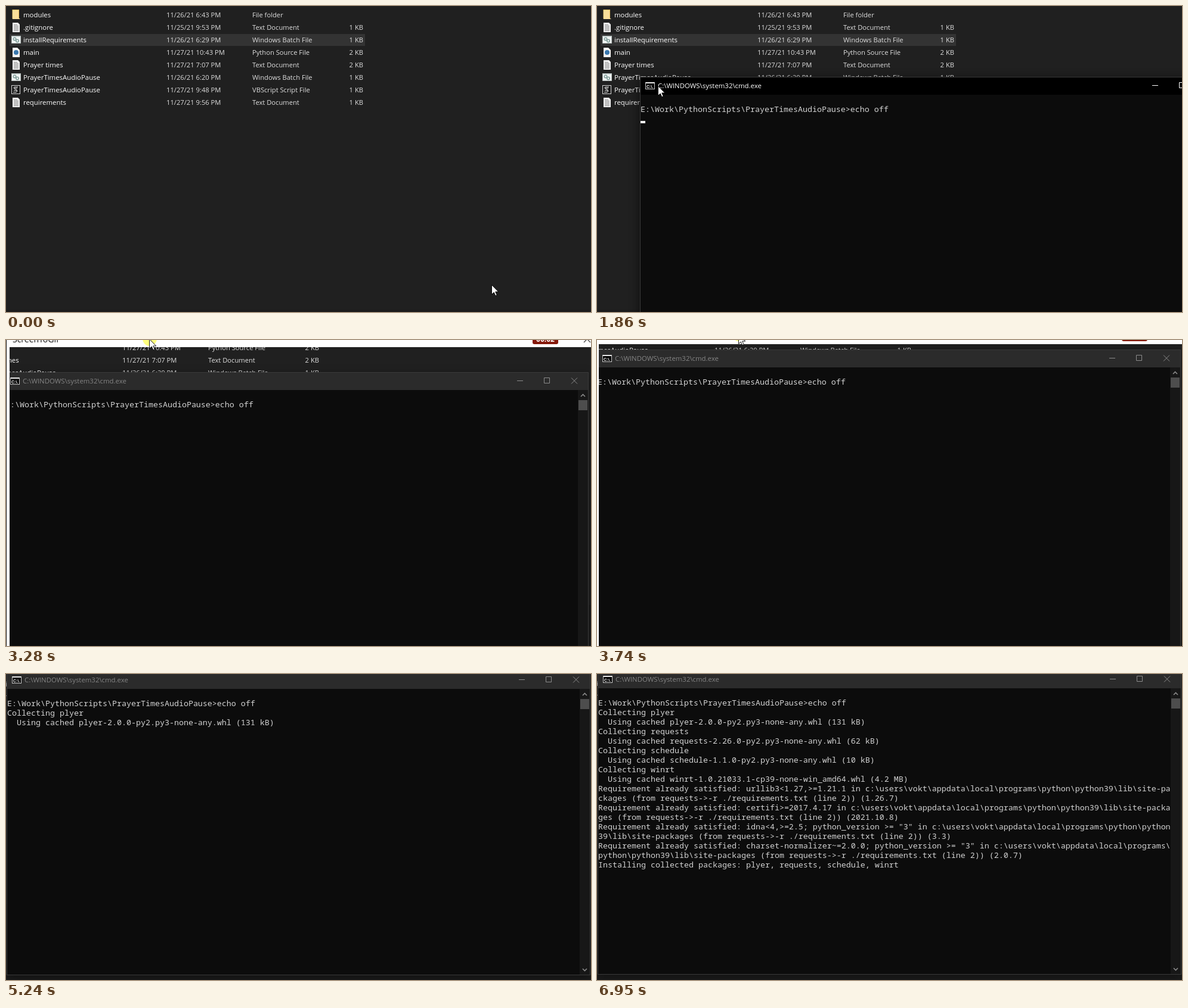
An HTML page for the animation above (8000 ms loop, 981 by 514 pixels).

```html
<!DOCTYPE html>
<html lang="en">
<head>
<meta charset="utf-8">
<title>Batch install</title>
<style>
html, body { margin: 0; width: 100%; height: 100%; overflow: hidden; background: #202020; }
svg { display: block; width: 981px; height: 514px; }
text { white-space: pre; }
.ui { font: 11.2px "Open Sans", sans-serif; }
.name { font-size: 11.4px; }
.mono { font: 13.333px "Noto Sans Mono", monospace; fill: #d2d2d2; }
</style>
</head>
<body>
<svg viewBox="0 0 981 514">
  <defs>
    <filter id="soft" x="-10%" y="-10%" width="120%" height="120%"><feGaussianBlur stdDeviation="9"/></filter>
    <g id="folder">
      <path d="M10.500 6h11.500v15.500h-11.500z" fill="#e9c262"/>
      <path d="M11 7h10v13l3 2h-13z" fill="#fbe09a"/>
    </g>
    <g id="doc">
      <path d="M11 7h9l3 3v13h-12z" fill="#f4f4f4"/>
      <path d="M13 10.500h6M13 12.500h8M13 14.500h8M13 16.500h8M13 18.500h8M13 20.500h8" stroke="#8d8d8d"/>
    </g>
    <g id="batch">
      <rect x="9.500" y="8.500" width="15" height="12" fill="#f3f6f5" stroke="#b5bdbb"/>
      <path d="M10 9.500h14" stroke="#c9d6d6"/>
      <g fill="none" stroke="#7f9c98" stroke-width="1.600"><circle cx="14.500" cy="13.500" r="2.200"/><circle cx="19" cy="16.500" r="2.200"/></g>
    </g>
    <g id="py">
      <path d="M11 7h8l4 4v12h-12z" fill="#f4f4f4"/>
      <circle cx="17" cy="15" r="4" fill="#3a78ae"/>
    </g>
    <g id="vbs">
      <rect x="9.500" y="7.500" width="14" height="14" fill="#1b1b1b" stroke="#d5d5d5"/>
      <path d="M20 10h-6q-2 1 0 3l4 2q2 2-1 4h-5M14 12h5M13 16h5" fill="none" stroke="#e8e8e8"/>
    </g>
  </defs>
  <g id="desk">
    <rect x="-50" y="-50" width="1250" height="560" fill="#202020"/>
    <rect x="-50" y="510" width="1250" height="400" fill="#1c1c1c"/>
    <rect x="6" y="47" width="596" height="20" fill="#333"/>
    <rect id="hover" x="6" width="596" height="20" fill="#4d4d4d"/>
    <g id="files" class="ui"></g>
    <g id="win">
      <rect id="shade" x="72" y="124" width="979" height="512" filter="url(#soft)"/>
      <rect x="72" y="119" width="979" height="511" fill="#0c0c0c"/>
      <rect id="bar" x="72" y="119" width="979" height="30"/>
      <rect x="81.500" y="128.500" width="15" height="11" fill="#000" stroke="#c8c8c8"/>
      <path d="M82 129h14" stroke="#e8e8e8" stroke-width="2"/>
      <text x="83" y="137.500" fill="#fff" style="font:bold 7px 'Liberation Sans',sans-serif">C:\.</text>
      <text id="title" class="ui name" x="102" y="138">C:\WINDOWS\system32\cmd.exe</text>
      <path id="btns" d="M931 133.500h10M976.500 128.500h9v9h-9zM1022 128.500l10 10M1032 128.500l-10 10" fill="none"/>
      <rect x="1033" y="149" width="17" height="480" fill="#171717"/>
      <rect x="1034" y="166" width="15" height="17" fill="#4d4d4d"/>
      <path d="M1038 160l3.500-3.500 3.500 3.500M1038 619l3.500 3.500 3.500-3.500" fill="none" stroke="#8a8a8a" stroke-width="1.600"/>
      <rect x="72.500" y="119.500" width="978" height="510" fill="none" stroke="#3a3a3a"/>
      <g id="out" class="mono"></g>
      <rect id="caret" x="73" y="193" width="8" height="4" fill="#f2f2f2"/>
    </g>
  </g>
  <g id="frame">
    <rect x="-6" y="-40" width="993" height="40" fill="#fff"/>
    <rect x="-5" y="-1" width="5" height="600" fill="#fff"/>
    <path d="M-5.500-40v640" stroke="#111"/>
    <text x="5" y="-8.500" fill="#111" style="font:14px 'Open Sans',sans-serif">ScreenToGif</text>
    <rect x="877" y="-25" width="43" height="20" rx="3" fill="#85190b"/>
    <text x="898.500" y="-9" fill="#fff" text-anchor="middle" style="font:bold 12px 'Open Sans',sans-serif">00:02</text>
    <path d="M963-19l11 11M974-19l-11 11" stroke="#444" stroke-width="1.300"/>
  </g>
  <g id="mouse">
    <circle id="press" r="12" fill="#ff0" fill-opacity=".5"/>
    <path d="M-.5 .5V16.500L3.200 13L5.800 18.700L8.200 17.600L5.700 12H10.700Z" fill="#fff" stroke="#000" stroke-width=".9"/>
  </g>
</svg>
<script>
const LOOP = 8000, TICK = 71, PHASE = 14;
const $ = id => document.getElementById(id);
const set = (el, attrs) => { for (const k in attrs) el.setAttribute(k, attrs[k]); };
const show = (el, on) => set(el, { visibility: on ? 'inherit' : 'hidden' });
const move = (el, x, y) => set(el, { transform: `translate(${x} ${y})` });
function add(parent, tag, attrs, text = '') {
  const el = document.createElementNS('http://www.w3.org/2000/svg', tag);
  set(el, attrs);
  el.textContent = text;
  return parent.appendChild(el);
}

const files = [
  ['folder', 'modules', '26/21 6:43', 'File folder', ''],
  ['doc', '.gitignore', '25/21 9:53', 'Text Document', '1 KB'],
  ['batch', 'installRequirements', '26/21 6:29', 'Windows Batch File', '1 KB'],
  ['py', 'main', '27/21 10:43', 'Python Source File', '2 KB'],
  ['doc', 'Prayer times', '27/21 7:07', 'Text Document', '2 KB'],
  ['batch', 'PrayerTimesAudioPause', '26/21 6:20', 'Windows Batch File', '1 KB'],
  ['vbs', 'PrayerTimesAudioPause', '27/21 9:48', 'VBScript Script File', '1 KB'],
  ['doc', 'requirements', '27/21 9:56', 'Text Document', '1 KB']
];
files.forEach(([icon, name, date, type, size], i) => {
  const y = 19 + 21 * i, fill = '#dedede', box = $('files');
  add(box, 'use', { href: '#' + icon, y: 21 * i });
  add(box, 'text', { x: 29, y, fill: '#fff', class: 'name' }, name);
  add(box, 'text', { x: 269, y, fill }, `11/${date} PM`);
  add(box, 'text', { x: 413, y, fill }, type);
  add(box, 'text', { x: 599, y, fill, 'text-anchor': 'end' }, size);
});

// Console output: when each batch is printed, wrapped at 120 columns
const site = 'c:\\users\\vokt\\appdata\\local\\programs\\python\\python39\\lib\\site-packages (from requests->-r ./requirements.txt (line 2))';
const need = (spec, ver) => `Requirement already satisfied: ${spec} in ${site} (${ver})`;
const cached = (file, size) => `  Using cached ${file}.whl (${size})`;
const log = [
  [1650, 'E:\\Work\\PythonScripts\\PrayerTimesAudioPause>echo off'],
  [5090, 'Collecting plyer', cached('plyer-2.0.0-py2.py3-none-any', '131 kB')],
  [5630, 'Collecting requests'],
  [5700, cached('requests-2.26.0-py2.py3-none-any', '62 kB')],
  [5960, 'Collecting schedule', cached('schedule-1.1.0-py2.py3-none-any', '10 kB')],
  [6320, 'Collecting winrt', cached('winrt-1.0.21033.1-cp39-none-win_amd64', '4.2 MB')],
  [6600, need('urllib3<1.27,>=1.21.1', '1.26.7'), need('certifi>=2017.4.17', '2021.10.8')],
  [6820, need('idna<4,>=2.5; python_version >= "3"', '3.3'),
    need('charset-normalizer~=2.0.0; python_version >= "3"', '2.0.7')],
  [6950, 'Installing collected packages: plyer, requests, schedule, winrt']
];
const lines = [];
for (const [at, ...texts] of log)
  for (const part of texts.flatMap(s => s.match(/.{1,120}/g)))
    lines.push({ at, el: add($('out'), 'text', { x: 73, y: 178 + 16 * lines.length }, part) });

const ramp = (t, a, b) => Math.max(0, Math.min(1, (t - a) / (b - a)));
const easeOut = p => 1 - (1 - p) ** 2;

// Mouse legs: start, end, destination
const legs = [
  [69, 70, 478, 317], [160, 910, 63, 60], [1520, 1860, 103, 134], [1860, 2270, 190, 34],
  [2270, 2740, 235, -21], [5900, 6120, 301, 157], [6120, 6750, 680, 520]
];
function mouseAt(t) {
  let x = 815, y = 468;
  for (const [a, b, toX, toY] of legs) {
    const f = easeOut(ramp(t, a, b));
    x += (toX - x) * f;
    y += (toY - y) * f;
  }
  return [Math.round(x), Math.round(y)];
}

function draw(t) {
  // Motion is seen at the screen's refresh ticks
  const k = Math.max(0, Math.floor((t - PHASE) / TICK + 0.01) * TICK + PHASE);

  // The recorder is dragged over the desktop; its frame runs ahead with the speed
  const drag = ramp(k, 2800, 4330);
  const panX = -74 * easeOut(ramp(k, 2800, 3280)) + 3 * easeOut(ramp(k, 3280, 4300));
  const panY = -123 * easeOut(drag) - (t >= 5240) - (t >= 5450);
  const lagY = drag > 0 ? Math.floor(17.6 * (1 - drag)) : 0, lagX = Math.floor(lagY / 2);
  move($('desk'), Math.round(panX), Math.round(panY));
  move($('frame'), lagX, lagY);

  let [mx, my] = mouseAt(k);
  mx += lagX;
  my += Math.round(1.6 * lagY);
  move($('mouse'), mx, my);
  const doubleClick = t >= 1040 && t < 1250 && (t < 1110 || t >= 1180);
  show($('press'), doubleClick || (t >= 2880 && t < 5500));

  const open = t >= 1520, row = Math.floor((my - 4) / 21);
  const covered = open && mx >= 72 && my >= 119;
  show($('hover'), t < 2740 && !covered && row >= 0 && row < files.length && mx < 603);
  set($('hover'), { y: 5 + 21 * row });

  const grow = ramp(t, 1450, 1650), s = 0.9 + 0.1 * grow;
  show($('win'), open);
  set($('win'), { opacity: grow, transform: `translate(${561.5 * (1 - s)} ${374.5 * (1 - s)}) scale(${s})` });

  const active = t < 2880;
  set($('bar'), { fill: active ? '#000' : '#2b2b2b' });
  set($('title'), { fill: active ? '#fff' : '#858585' });
  set($('btns'), { stroke: active ? '#fff' : '#8c8c8c' });
  set($('shade'), { opacity: active ? 0.6 : 0.35 });
  show($('caret'), t >= 1650 && t < 2400);
  for (const l of lines) show(l.el, t >= l.at);
}

const start = performance.now();
function tick() {
  draw((performance.now() - start) % LOOP);
  requestAnimationFrame(tick);
}
tick();
</script>
</body>
</html>
```
